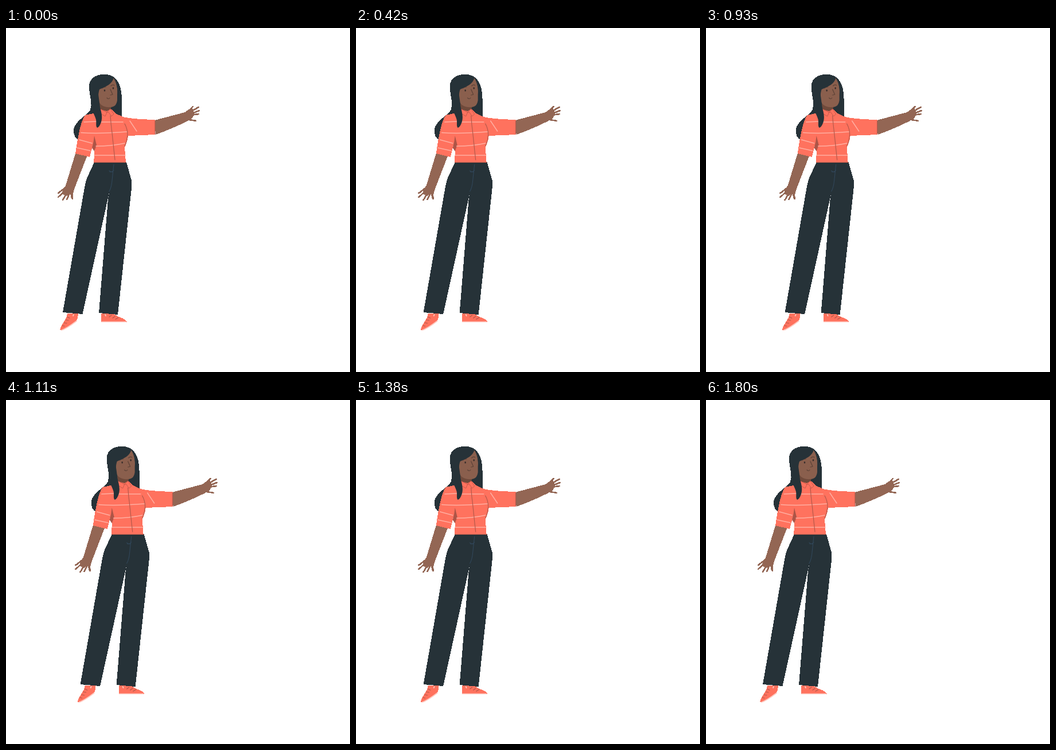
Write an HTML page that moves like this. It is 600 px wide and 600 px high and loops after 1.83 s.

```html
<!DOCTYPE html>
<html lang="en">
<head>
<meta charset="utf-8">
<style>
  html, body { margin: 0; width: 100%; height: 100%; overflow: hidden; background: #fff; }
  svg { display: block; width: 100vw; height: 100vh; }
  path { stroke-linecap: round; stroke-linejoin: round; }
  .skin, .finger, .coral, .dark { shape-rendering: crispEdges; }
  .skin { fill: #936654; }
  .finger { fill: none; stroke: #936654; stroke-width: 2.7; }
  .coral { fill: #ff725e; }
  .dark { fill: #263238; }
  .smooth { shape-rendering: auto; }
  .stripe { fill: none; stroke: #ffaea1; stroke-width: 1.5; }
  .fold { fill: none; stroke: #b2594b; stroke-width: 1.2; }
  .sole { fill: none; stroke: #ffc8bf; stroke-width: 1.7; }
  .ink { fill: none; stroke: #5d4338; stroke-width: 1.2; }
</style>
</head>
<body>
<svg viewBox="0 0 600 600">
  <g id="walker">
    <!-- hair behind -->
    <path class="dark" d="M145 106C143 90 155 81 170 81C188 80 202 91 202 126L202 156L165 160L134 188L127 195C121 194 117 185 118 177C121 161 141 153 147 143C151 133 146 118 145 106Z"/>

    <!-- lowered arm -->
    <path class="skin" d="M121 219L141.5 223L119 281C117 287 116 292 116 298L114 298L112 289L105 293L97 289C99 283 101 278 104 275Z"/>
    <path class="finger" d="M104 278L91 288M105 282L91 295M107 286L99 300M112 286L106 299M114 284L116 298"/>

    <!-- raised arm -->
    <path class="skin" d="M259 161L312 147C317 143 321 140 325 140L329 150L324 158L315 163Q290 175.500 261 186Z"/>
    <path class="finger" d="M317 146L326 137M320 147L336 138M322 150L337 144M322 152L336 150M317 159C323 162 326 160 331 162"/>

    <!-- shoes -->
    <path class="coral" d="M107 498H126C125 506 125 509 121 512L101 526Q96 529 94 526C96 518 104 509 106 503Z"/>
    <path class="sole" d="M97 527Q106 524 123 511"/>
    <path class="fold" d="M107 504L111 506M104 509L109 510M101 514L106 515M98 519L102 520"/>
    <path class="coral" d="M166 498H187L197 504Q208 507 211 513H166Z"/>
    <path class="sole" d="M167 512.500H209"/>
    <path class="fold" d="M184 501L180 504M190 503L186 506M196 505L191 508"/>
    <path class="sole" d="M118 500L117 502M173 500L174 502"/>

    <!-- trousers -->
    <path class="dark" d="M154 234H210L219 266Q220 272 219 279L195 500L162 497L178 298L180 287L133.500 499L99 496L137 278Q139 267 142 260Z"/>
    <path fill="none" stroke="#31475a" stroke-width="1.1" d="M188 238L185 266Q184 278 180 285M180 249Q184 253 188 248M181 251H186"/>

    <!-- shirt -->
    <path class="coral" d="M163 143L184 142L191 149L204 155Q220 159 260 160V186L213 188Q212 198 207 208L209 235H153L155 207L152 202L146 225L121 219C125 193 130 162 138 152L152 149Z"/>
    <path fill="#ad5547" d="M154 188Q153 199 150 209L154 215L158 204Z"/>
    <path class="stripe" d="M136 164L158 163M166 164L204 164M131 182.500Q160 185 211 181M128 195L150 201M124 209L147 214M157 206Q185 206 207 201M154 222H208M216 162L228 180"/>
    <path class="fold" d="M182 153Q183 168 185 183L190 230"/>
    <path class="fold" d="M207 167Q212 176 212 186Q211 198 207 206M154 234.500H209M260 162V185"/>

    <!-- neck, face -->
    <path fill="#704a3b" d="M163 126H185L183 141L176 145L164 142Z"/>
    <path fill="#8a5f4d" d="M160 109L176 96L188 86C193 94 195 105 194 116L194 126C193 133 190 138 182 138C173 139 165 135 163 130Z"/>
    <path fill="#ff725e" stroke="#b95548" stroke-width=".8" d="M164 141L176 147L173 154L163 148ZM176 147L182 141L188 150L184 154L179 147Z"/>
    <path class="ink" d="M182 107L186 116L182 117M176 122Q179 125 181 122M168 105Q170 102 174 103M183 101Q186 98 189 100"/>
    <ellipse cx="172" cy="109" rx="1.3" ry="1.8" fill="#382d2b"/>
    <ellipse cx="187" cy="105" rx="1.3" ry="1.8" fill="#382d2b"/>

    <!-- hair in front -->
    <path class="dark smooth" d="M188 87C185 97 176 102 163 107C160 116 161 125 163 135C166 145 169 155 166 164Q163 173 159 174C156 171 158 166 157 160C155 152 150 146 149 136C152 126 146 116 147 104C151 84 177 78 188 87Z"/>
    <path class="dark smooth" d="M186 84L188 88C194 97 196 112 194 130C194 139 196 148 202 153C202 127 202 98 186 84Z"/>
  </g>
</svg>
<script>
  const LOOP = 1830, STEP = 30, HALF = 900, REACH = 40;
  const walker = document.getElementById("walker");
  const start = performance.now();

  function draw() {
    const elapsed = (performance.now() - start) % LOOP;
    const t = Math.floor(elapsed / STEP) * STEP;
    const x = REACH * (1 - Math.abs(t - HALF) / HALF);
    walker.setAttribute("transform", `translate(${x.toFixed(2)} 0)`);
    requestAnimationFrame(draw);
  }
  draw();
</script>
</body>
</html>
```
